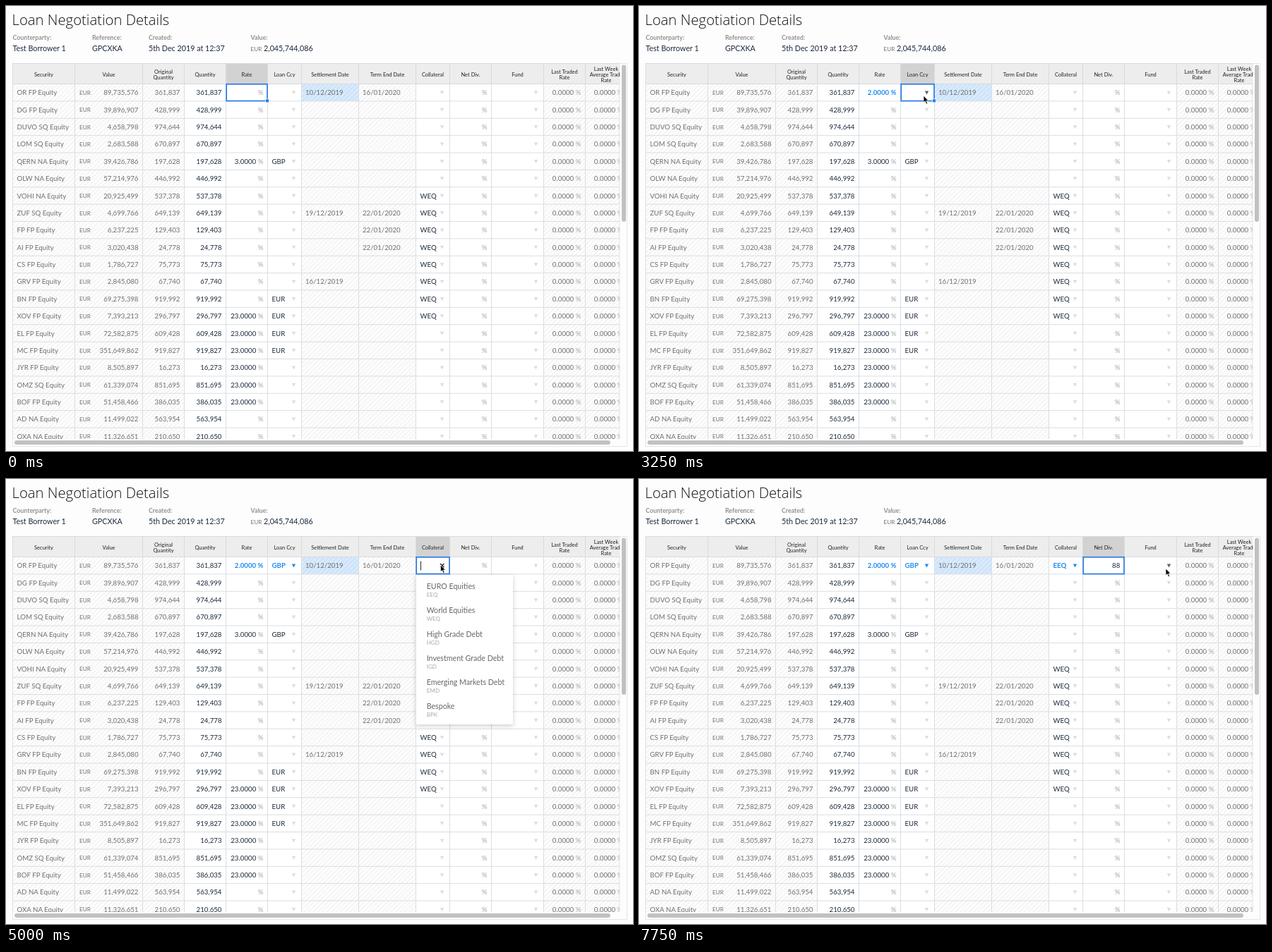
An HTML page that plays this animation: 888 by 631 pixels, repeating every 8000 ms.

```html
<!DOCTYPE html>
<html lang="en">
<head>
<meta charset="utf-8">
<title>Loan Negotiation Details</title>
<style>
html, body { margin: 0; width: 100%; height: 100%; overflow: hidden; background: #fdfdfd; }
svg { display: block; width: 888px; height: 631px; }
text { font: 9.7px Lato, sans-serif; fill: #1b2a3d; }
.title { font: 300 20.3px "Open Sans", sans-serif; fill: #111; }
.label { font-size: 8.8px; font-weight: 700; fill: #929292; }
.value { font-size: 10.75px; }
.head { font-size: 7.5px; fill: #222; }
.dim { fill: #707070; }
.small { font-size: 8.1px; }
.set { font-weight: 700; fill: #1e8cf0; }
.pct { fill: #a6a6a6; }
.option { font-size: 10.65px; fill: #666; }
.code { font-size: 8.1px; fill: #a9a9a9; }
.right { text-anchor: end; }
.mid { text-anchor: middle; }
.menu { filter: drop-shadow(0 2px 3px #0003); }
</style>
</head>
<body>
<svg viewBox="0 0 888 631">
  <defs>
    <pattern id="hatch" width="4.6" height="4.6" patternUnits="userSpaceOnUse" patternTransform="rotate(45)">
      <rect width="4.6" height="4.6" fill="#fff"/><rect width="2.3" height="4.6" fill="#f5f5f5"/>
    </pattern>
    <pattern id="blueHatch" width="4.6" height="4.6" patternUnits="userSpaceOnUse" patternTransform="rotate(45)">
      <rect width="4.6" height="4.6" fill="#dcecfc"/><rect width="2.3" height="4.6" fill="#cbe2f9"/>
    </pattern>
    <clipPath id="view"><rect x="9" y="81" width="860.5" height="533"/></clipPath>
  </defs>
  <g id="page"></g>
  <g id="table" clip-path="url(#view)"></g>
  <g id="live" clip-path="url(#view)"></g>
  <g id="overlay"></g>
</svg>
<script>
const LOOP = 8000, TOP = 110.5, ROW = 24.375, BLUE = '#2b7bea', LINE = '#dadde3';
const RATE = 4, CCY = 5, SETTLE = 6, END = 7, COLL = 8, DIV = 9, FUND = 10;

// left edge, heading, read-only
const columns = [
  [9.5, 'Security', 1], [97.5, 'Value', 1], [193.5, 'Original/Quantity', 1], [252.5, 'Quantity'],
  [311.5, 'Rate'], [370.5, 'Loan Ccy'], [418.5, 'Settlement Date', 1], [499.5, 'Term End Date', 1],
  [580.5, 'Collateral'], [628.5, 'Net Div.'], [687.5, 'Fund'],
  [761.5, 'Last Traded/Rate', 1], [820.5, 'Last Week/Average Trade/Rate', 1], [879.5, '']
];
const left = c => columns[c][0], right = c => columns[c + 1][0], width = c => right(c) - left(c);

// security | value | quantity | rate | currency | settlement | term end | collateral
const rows = `OR FP|89735576|361837|||10/12/2019|16/01/2020|
DG FP|39896907|428999
DUVO SQ|4658798|974644
LOM SQ|2683588|670897
QERN NA|39426786|197628|3|GBP
OLW NA|57214976|446992
VOHI NA|20925499|537378|||||WEQ
ZUF SQ|4699766|649139|||19/12/2019|22/01/2020|WEQ
FP FP|6237225|129403||||22/01/2020|WEQ
AI FP|3020438|24778||||22/01/2020|WEQ
CS FP|1786727|75773|||||WEQ
GRV FP|2845080|67740|||16/12/2019||WEQ
BN FP|69275398|919992||EUR|||WEQ
XOV FP|7393213|296797|23|EUR|||WEQ
EL FP|72582875|609428|23|EUR
MC FP|351649862|919827|23|EUR
JYR FP|8505897|16273|23
OMZ SQ|61339074|851695|23
BOF FP|51458466|386035|23
AD NA|11499022|563954
OXA NA|11326651|210650`.split('\n').map(line => line.split('|'));

const menus = {
  [CCY]: [113.5, 'UK Pound Sterling/GBP,Euro/EUR,US Dollar/USD,Swiss Franc/CHF,Danish Krone/DKK,' +
    'Hong Kong Dollar/HKD,Japanese Yen/JPY,Norwegian Krone/NOK,Swedish Krona/SEK'],
  [COLL]: [137.5, 'EURO Equities/EEQ,World Equities/WEQ,High Grade Debt/HGD,' +
    'Investment Grade Debt/IGD,Emerging Markets Debt/EMD,Bespoke/BPK']
};

// Each step changes part of the state; edit is the text being typed, hot the hovered cell.
const steps = [
  [0, { cell: RATE }],
  [250, { cursor: [386.5, 145.5] }],
  [500, { cursor: [347, 129] }],
  [1750, { edit: '2', caret: true }],
  [2250, { cursor: [388, 129], caret: false }],
  [2500, { cursor: [400, 131], hot: CCY }],
  [2750, { cursor: [403, 127.3], cell: CCY, edit: null, rate: '2' }],
  [3500, { edit: '', caret: true, menu: CCY }],
  [3750, { cursor: [405, 153], hot: null, hover: true }],
  [4000, { cursor: [407.5, 154.5], caret: false }],
  [4250, { cursor: [504.5, 144], cell: null, edit: null, menu: null, hover: false, ccy: 'GBP' }],
  [4500, { cursor: [605, 123] }],
  [4750, { cursor: [615.5, 122], hot: COLL }],
  [5000, { cell: COLL, edit: '', caret: true, menu: COLL }],
  [5250, { cursor: [622, 151], hot: null, hover: true }],
  [5500, { cursor: [625, 152], caret: false }],
  [5750, { cursor: [660.5, 129], cell: null, edit: null, menu: null, hover: false, coll: 'EEQ' }],
  [6000, { cursor: [660.5, 123.5], cell: DIV }],
  [6500, { cursor: null }],
  [7000, { edit: '8', caret: true }],
  [7250, { edit: '88' }],
  [7750, { caret: false, cursor: [746, 127], hot: FUND }]
];

const text = (x, y, s, cls = '') => `<text x="${x}" y="${y}" class="${cls}">${s}</text>`;
const rect = (x, y, w, h, fill, more = '') =>
  `<rect x="${x}" y="${y}" width="${w}" height="${h}" fill="${fill}" ${more}/>`;
const path = (d, stroke, more = '') => `<path d="${d}" fill="none" stroke="${stroke}" ${more}/>`;
const number = n => Number(n).toLocaleString('en-US');
const fixed = n => n ? Number(n).toFixed(4) : '';
const baseline = r => TOP + 15.8 + ROW * r;
const percent = (c, r, value, cls = '') => text(right(c) - 6, baseline(r),
  `${value} <tspan class="${cls === 'set' ? 'set' : 'pct'}">%</tspan>`, 'right ' + cls);
const triangle = (c, r, fill = '#dcdcdc') =>
  `<path d="M${right(c) - 13.7} ${TOP + 9.9 + ROW * r}h5.4l-2.7 5z" fill="${fill}"/>`;

function drawPage() {
  const fields = [[9.5, 'Counterparty', 'Test Borrower 1'], [122, 'Reference', 'GPCXKA'],
    [202, 'Created', '5th Dec 2019 at 12:37'],
    [346.5, 'Value', '<tspan class="small dim">EUR</tspan> 2,045,744,086']];
  return text(8.5, 27.3, 'Loan Negotiation Details', 'title') +
    fields.map(([x, label, value]) =>
      text(x, 48.3, label + ':', 'label') + text(x, 64.3, value, 'value')).join('') +
    rect(9.5, 81.5, 870, 543, '#fdfdfd', 'stroke="#e6e6e6"') +
    rect(872, 83.5, 6, 222.5, '#c1c1c1', 'rx="3"') +
    rect(12, 616, 844, 6, '#c1c1c1', 'rx="3"');
}

function drawRow(row, r) {
  const [security, value, quantity, rate, ccy = '', settle = '', end = '', coll = ''] = row;
  const y = baseline(r);
  let out = text(15.5, y, security + ' Equity', 'dim') + text(104, y - .4, 'EUR', 'small dim') +
    text(right(1) - 6, y, number(value), 'right dim') +
    text(right(2) - 6, y, number(quantity), 'right dim') +
    text(right(3) - 6, y, number(quantity), 'right') +
    text(left(SETTLE) + 5.5, y, settle, 'dim') + text(left(END) + 5.5, y, end, 'dim') +
    percent(11, r, '0.0000', 'dim') + percent(12, r, '0.0000', 'dim');
  if (r) out += percent(RATE, r, fixed(rate)) + percent(DIV, r, '') +
    text(left(CCY) + 6, y, ccy) + text(left(COLL) + 6, y, coll) +
    [CCY, COLL, FUND].map(c => triangle(c, r)).join('');
  return out;
}

function drawTable() {
  const cells = columns.slice(0, -1);
  return cells.map(([x, , locked], c) => rect(x, TOP, width(c), 520, locked ? 'url(#hatch)' : '#fff')).join('') +
    rect(left(SETTLE), TOP, width(SETTLE), ROW, 'url(#blueHatch)') +
    path(rows.map((_, r) => `M9 ${TOP + ROW * r}H880`).join('') +
      columns.map(([x]) => `M${x} ${TOP}V614`).join(''), LINE) +
    rows.map(drawRow).join('') + path('M869 82V614', LINE);
}

function drawHeader(selected) {
  return columns.slice(0, -1).map(([x, heading], c) => {
    const lines = heading.split('/');
    return rect(x, 81.5, width(c), 29, c === selected ? '#d2d2d2' : '#ededed', 'stroke="#d8dade"') +
      lines.map((line, i) => text(x + width(c) / 2, 99.7 + (i - (lines.length - 1) / 2) * 8, line, 'head mid')).join('');
  }).join('');
}

function drawLive(s) {
  const y = baseline(0);
  const tint = (c, value) => value ? '#1e8cf0' : s.hot === c ? '#606060' : undefined;
  return drawHeader(s.cell) +
    percent(RATE, 0, fixed(s.rate), s.rate ? 'set' : '') + percent(DIV, 0, '') +
    text(left(CCY) + 6, y, s.ccy || '', 'set') + text(left(COLL) + 6, y, s.coll || '', 'set') +
    triangle(CCY, 0, tint(CCY, s.ccy)) + triangle(COLL, 0, tint(COLL, s.coll)) + triangle(FUND, 0, tint(FUND));
}

function drawSelection(s) {
  const c = s.cell, editing = s.edit != null, x = left(c), end = right(c);
  let out = rect(x + .7, TOP + .3, width(c) - 1.2, ROW - .6, editing ? '#fff' : 'none', `stroke="${BLUE}" stroke-width="1.7"`);
  if (!editing) return out + rect(end - 3, TOP + ROW - 3, 5, 5, BLUE, 'stroke="#fff" stroke-width=".8"');
  if (menus[c]) out += path(`M${end - 13.5} 120l5.4 5.4m0-5.4l-5.4 5.4`,
    s.hot === c ? '#333' : '#bbb', `stroke-width="${s.hot === c ? 1.6 : 1}"`);
  else out += text(end - 6.2, baseline(0), s.edit, 'right');
  if (s.caret) out += path(`M${menus[c] ? x + 7 : end - 6} 116.5v13`, '#111', 'stroke-width=".9"');
  return out;
}

function drawMenu(s) {
  const [w, list] = menus[s.menu], x = left(s.menu), items = list.split(',');
  return rect(x, 136, w, items.length * 34 + 8, '#fff', 'class="menu"') +
    (s.hover ? rect(x, 136.5, w, 37.5, '#f3f5f7') : '') +
    items.map((item, i) => {
      const [name, code] = item.split('/');
      return text(x + 15.2, 155.8 + 34 * i, name, 'option') + text(x + 15.2, 167.4 + 34 * i, code, 'code');
    }).join('');
}

const drawCursor = ([x, y]) => `<path transform="translate(${x} ${y})" fill="#000" stroke="#fff" stroke-width=".7"
  d="M0 0V9.6L2.2 7.6L3.9 11.6L5.6 10.9L3.9 7H6.9Z"/>`;

const layer = id => document.getElementById(id);
layer('page').innerHTML = drawPage();
layer('table').innerHTML = drawTable();

let shown = 0;
function tick() {
  const now = performance.now() % LOOP;
  const past = steps.filter(([time]) => time <= now);
  if (past.length !== shown) {
    shown = past.length;
    const state = Object.assign({}, ...past.map(step => step[1]));
    layer('live').innerHTML = drawLive(state);
    layer('overlay').innerHTML = (state.cell != null ? drawSelection(state) : '') +
      (state.menu ? drawMenu(state) : '') + (state.cursor ? drawCursor(state.cursor) : '');
  }
  requestAnimationFrame(tick);
}
tick();
</script>
</body>
</html>
```
